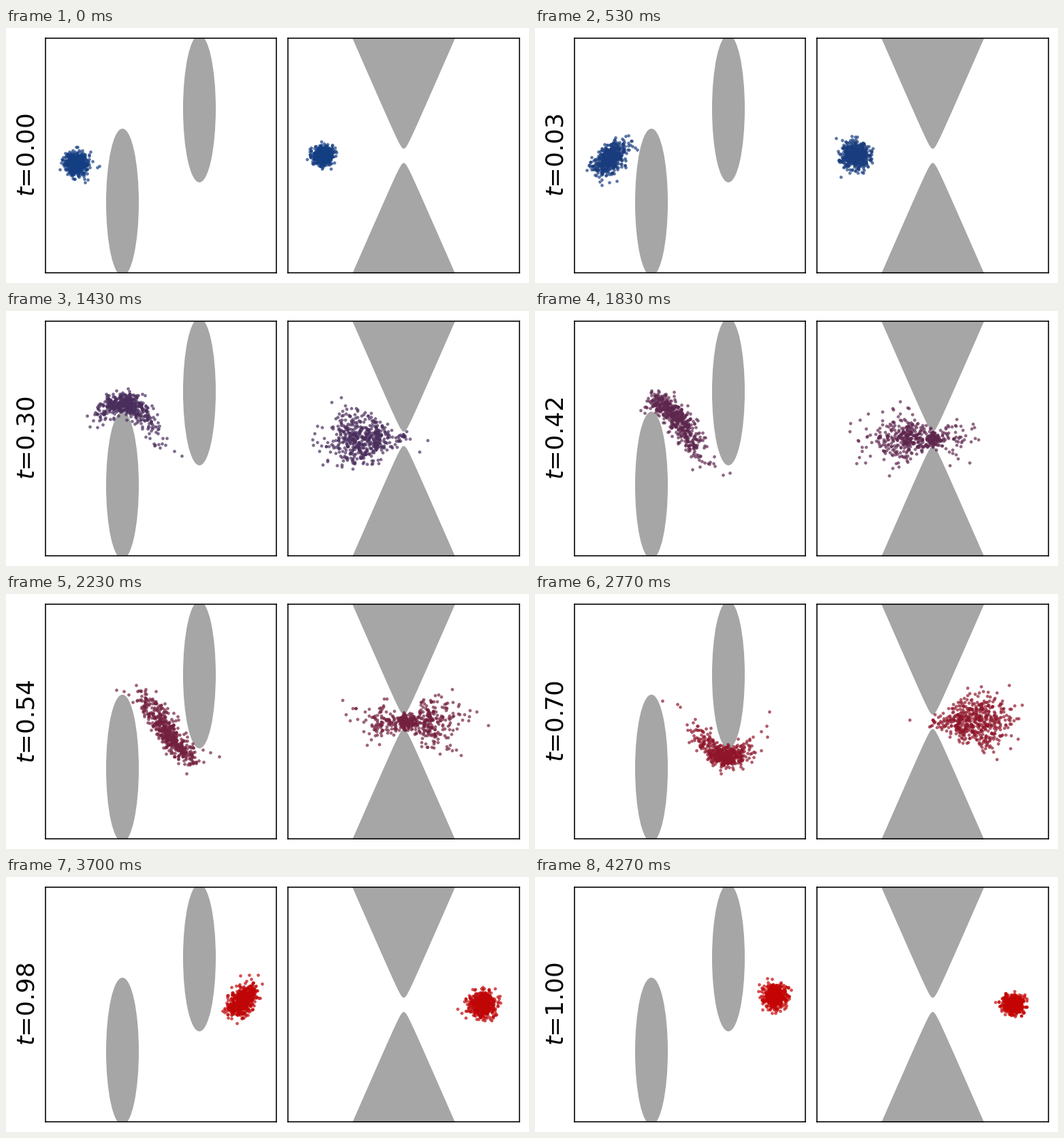
Write a matplotlib script that moves like this. It is 768x375 px and loops after 4310 ms.

```python
import matplotlib.pyplot as plt
import numpy as np
from matplotlib.animation import FuncAnimation
from matplotlib.patches import Ellipse

W, H, DPI = 768, 375, 100
PT = 72 / DPI
FRAMES, LOOP = 258, 4310
HOLD, STEPS = 13, 100
N = 512
PAPER, WALL = "white", "#a6a6a6"
COLD = np.array([20, 62, 130]) / 255
HOT = np.array([196, 4, 4]) / 255
TOP, BOTTOM, MID = 15, 360, 187.5
LEFT_MID, RIGHT_MID = 227.5, 583.6

rng = np.random.default_rng(7)


def bridges():
    """Unit Brownian bridges, one row per time step."""
    walk = rng.normal(size=(STEPS, N)).cumsum(axis=0) / np.sqrt(STEPS)
    walk = np.vstack([np.zeros(N), walk])
    return walk - np.linspace(0, 1, STEPS + 1)[:, None] * walk[-1]


class Cloud:
    def __init__(self, spread):
        self.along, self.across = bridges(), bridges()
        self.first, self.last = rng.normal(0, spread, (2, 2, N))

    def ends(self, t):
        return (1 - t) ** 3 * self.first + t ** 3 * self.last


def s_curve(cloud, k):
    """Positions on the S-shaped way around the two ellipses."""
    t = k / STEPS
    mean = 2 * t - 1
    reach, bend = 124.5, 55.9
    sigma = 48 * (1 - 0.22 * np.sin(np.pi * t) ** 4)
    u = mean + sigma * cloud.along[k] / reach
    wave = (np.sin(2 * np.pi * u) + np.sin(2 * np.pi * mean)) / 2
    y = bend * np.sin(np.pi * u) + 7.6 * wave - 11.5 * mean
    slope = np.pi * bend * np.cos(np.pi * u)
    side = 16 * cloud.across[k] / np.hypot(reach, slope)
    ex, ey = cloud.ends(t)
    return np.column_stack([LEFT_MID + reach * u - slope * side + ex,
                            MID + y + reach * side + ey])


def wall_height(dx):
    return np.sqrt(10.5 ** 2 + (2.29 * dx) ** 2)


def neck(cloud, k):
    """Positions on the way through the narrow gap."""
    t = k / STEPS
    sigma = 46 * (1 + 0.5 * np.sin(np.pi * t) ** 4)
    ex, ey = cloud.ends(t)
    ease = t - 0.06 * np.sin(2 * np.pi * t)
    dx = 237 * (ease - 0.5) + sigma * cloud.along[k] + ex
    dx -= 5 * np.sin(2 * np.pi * dx / 40) * np.exp(-(dx / 45) ** 2)
    gap = wall_height(dx) ** 2
    squeeze = 0.2 + 0.8 * gap / (gap + 70 ** 2)
    dy = (48 * cloud.across[k] + ey) * squeeze
    return np.column_stack([RIGHT_MID + 0.5 + dx, MID + dy])


fig = plt.figure(figsize=(W / DPI, H / DPI), dpi=DPI, facecolor=PAPER)


def panel(left, right):
    ax = fig.add_axes([left / W, 1 - BOTTOM / H,
                       (right - left) / W, (BOTTOM - TOP) / H])
    ax.set(xlim=(left, right), ylim=(BOTTOM, TOP), xticks=[], yticks=[],
           facecolor=PAPER)
    for spine in ax.spines.values():
        spine.set_linewidth(1.6 * PT)
    return ax


def dots(ax):
    return ax.scatter(np.zeros(N), np.zeros(N), s=(4.7 * PT) ** 2,
                      linewidths=0, alpha=0.7, zorder=3)


ax_left, ax_right = panel(58, 397), panel(414, 754)
for sign in (-1, 1):
    ax_left.add_patch(Ellipse((LEFT_MID + sign * 56.5, MID - sign * 69),
                              48, 217, color=WALL, lw=0))
    dx = np.linspace(-90, 90, 361)
    ax_right.fill_between(RIGHT_MID + dx, MID + sign * wall_height(dx),
                          MID + sign * 250, color=WALL, lw=0)

label = fig.text(41 / W, 1 - 187 / H, "", fontsize=35.6 * PT, rotation=90,
                 rotation_mode="anchor", ha="center", va="baseline",
                 family="DejaVu Sans")

scenes = [(dots(ax_left), Cloud(8.5), s_curve),
          (dots(ax_right), Cloud(7.5), neck)]


def update(frame):
    # Two frames per step, with each step starting half a step early.
    k = min(max((frame + 1) // 2 - HOLD, 0), STEPS)
    t = k / STEPS
    label.set_text(f"$t$={t:.2f}")
    for points, cloud, place in scenes:
        points.set_offsets(place(cloud, k))
        points.set_facecolor(COLD + t * (HOT - COLD))
    return [label] + [scene[0] for scene in scenes]


anim = FuncAnimation(fig, update, frames=FRAMES, interval=LOOP / FRAMES,
                     repeat=True, repeat_delay=0)
plt.show()
```
